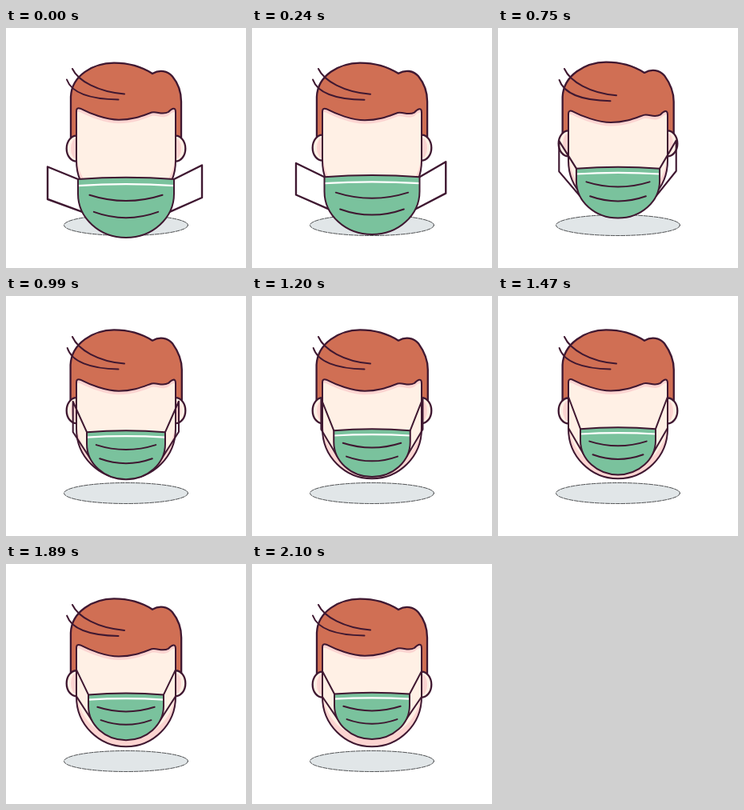
An HTML page with a canvas that plays this animation: 300 by 300 pixels, repeating every 2.73 s.

```html
<!DOCTYPE html>
<html lang="en">
<head>
<meta charset="utf-8">
<title>Face mask</title>
<style>
html, body { margin: 0; width: 100%; height: 100%; overflow: hidden; background: #fff; }
canvas { display: block; width: 300px; height: 300px; }
</style>
</head>
<body>
<canvas id="stage" width="300" height="300"></canvas>
<script>
const ctx = document.getElementById('stage').getContext('2d');
const LOOP = 2730, STEP = 30, MOVE_END = 2100, CX = 150;
const INK = '#3f1831', HAIR = '#d06f54', SKIN = '#fff0e5', BLUSH = '#fcd4d1';
const GREEN = '#7ac29d', SHADE = '#e1e6e8';

const times = [0, 240, 510, 990, 1470, 1740, 2100];
const keys = {
  top:    [189, 186.3, 182, 170.2, 166.2, 164.4, 162.5],
  height: [73, 71.7, 66, 59, 57.2, 57, 56.5],
  half:   [60, 59.5, 56, 49, 47, 47, 47],
  loopX:  [52, 55, 66, 83.7, 88, 88, 88],
  loopT:  [173.5, 169, 154, 132, 126, 130, 134],
  loopB:  [214, 208.5, 193, 170, 165, 165, 166]
};

// Smooth curve through the keys without overshoot
function sample(v, t) {
  const last = times.length - 1;
  if (t >= times[last]) return v[last];
  let i = 0;
  while (t >= times[i + 1]) i++;
  const slope = j => (v[j + 1] - v[j]) / (times[j + 1] - times[j]);
  const tangent = j => {
    if (j === 0 || j === last) return 0;
    const a = slope(j - 1), b = slope(j);
    return a * b > 0 ? 2 * a * b / (a + b) : 0;
  };
  const d = times[i + 1] - times[i], u = (t - times[i]) / d;
  const u2 = u * u, u3 = u2 * u;
  return (2 * u3 - 3 * u2 + 1) * v[i] + (u3 - 2 * u2 + u) * d * tangent(i) +
    (3 * u2 - 2 * u3) * v[i + 1] + (u3 - u2) * d * tangent(i + 1);
}

// Hair and ears ease to a raised pose, rest, then ease back
function lift(t) {
  const u = Math.max(0, Math.min(1, t / 1020, (MOVE_END - t) / 720));
  return (1 - Math.cos(Math.PI * u)) / 2;
}

function paint(path, fill, stroke, width = 2) {
  if (fill) { ctx.fillStyle = fill; ctx.fill(path); }
  if (stroke) { ctx.strokeStyle = stroke; ctx.lineWidth = width; ctx.stroke(path); }
}

function oval(x, y, rx, ry) {
  const p = new Path2D();
  p.ellipse(x, y, rx, ry, 0, 0, Math.PI * 2);
  return p;
}

function fringe(p, dy) {
  p.lineTo(88, 104 + dy);
  p.quadraticCurveTo(88, 99 + dy, 93, 100.7 + dy);
  p.bezierCurveTo(105, 107 + dy, 125, 114.7 + dy, 141, 114.7 + dy);
  p.bezierCurveTo(160, 114.7 + dy, 172, 109 + dy, 182, 105.5 + dy);
  p.bezierCurveTo(189, 103.7 + dy, 195, 109.5 + dy, 203, 105 + dy);
  p.bezierCurveTo(207, 100.5 + dy, 212, 98 + dy, 212, 105 + dy);
}

function face(dy, cy, rx, ry) {
  const p = new Path2D();
  p.moveTo(CX - rx, cy);
  fringe(p, dy);
  p.lineTo(CX + rx, cy);
  p.ellipse(CX, cy, rx, ry, 0, 0, Math.PI);
  p.closePath();
  return p;
}

function drawShadow() {
  const p = oval(CX, 246.5, 77.5, 13);
  paint(p, SHADE);
  ctx.setLineDash([5, 1.5]);
  paint(p, null, '#26282a', 0.8);
  ctx.setLineDash([]);
}

function drawEar(x, y) {
  const ear = oval(x, y, 12.3, 16);
  paint(ear, SKIN);
  paint(oval(x, y, 7, 13), BLUSH);
  paint(ear, null, INK, 2.3);
}

function drawHead(k) {
  const dy = 4 * k, up = -1.3 * k, l = 81 - 0.4 * k, r = 219 + 0.8 * k;
  const hair = new Path2D();
  hair.moveTo(l, 140 - 7 * k);
  hair.lineTo(l, 86);
  hair.bezierCurveTo(82, 59, 109, 44 + up, 135, 43.7 + up);
  hair.bezierCurveTo(155, 43.7 + up, 172, 50 + up, 183, 57 + up);
  hair.bezierCurveTo(192, 51.8 + up, 202, 53.5 + up, 208, 60.5 + up);
  hair.bezierCurveTo(215, 69, r, 80, r, 92);
  hair.lineTo(r, 140 - 7 * k);
  hair.closePath();
  paint(hair, HAIR, INK, 2.3);

  for (const x of [88, 212]) drawEar(x, 150.7 - 7.5 * k);

  const outline = face(dy, 166, 62, 62.3);
  paint(outline, BLUSH);
  ctx.save();
  ctx.clip(outline);
  paint(face(dy + 4.5, 160, 61, 58), SKIN);
  ctx.restore();
  paint(outline, null, INK);

  const strands = new Path2D();
  strands.moveTo(83, 51);
  strands.bezierCurveTo(90, 66 + k, 115, 80 + 2 * k, 148, 82.5 + 2 * k);
  strands.moveTo(76 + 0.7 * k, 64.5 + 0.5 * k);
  strands.bezierCurveTo(82, 81 + k, 105, 89 + 2 * k, 140.5, 89.5 + 2 * k);
  paint(strands, null, INK);
}

function drawLoops(m) {
  const p = new Path2D();
  const open = (88 - m.loopX) / 36;
  for (const s of [-1, 1]) {
    // The right loop opens a little less and sits higher
    const lag = s > 0 ? open : 0;
    const out = CX + s * (CX - m.loopX) - 3 * lag;
    p.moveTo(CX + s * m.half, m.top);
    p.lineTo(out, m.loopT - 2 * lag);
    p.lineTo(out, m.loopB - 2 * lag);
    p.lineTo(CX + s * m.half * 0.91, m.top + m.height * 0.56);
  }
  paint(p, null, INK, 2 + 0.4 * open);
}

function drawMask(m) {
  const { top, height: h, half: w } = m;
  const y = f => top + h * f;
  const arc = (reach, at, bend) => {
    const p = new Path2D();
    p.moveTo(CX - w * reach, y(at));
    p.quadraticCurveTo(CX, y(at + bend), CX + w * reach, y(at));
    return p;
  };
  const body = arc(1, 0, -0.065);
  body.lineTo(CX + w, y(0.25));
  body.ellipse(CX, y(0.25), w, h * 0.75, 0, 0, Math.PI);
  body.closePath();
  paint(body, GREEN);
  ctx.save();
  ctx.clip(body);
  paint(arc(1, 0.11, -0.05), null, '#fff', 2.2);
  ctx.restore();
  paint(body, null, INK);
  paint(arc(0.76, 0.27, 0.2), null, INK);
  paint(arc(0.67, 0.56, 0.2), null, INK);
}

function draw(t) {
  const m = {};
  for (const name in keys) m[name] = sample(keys[name], t);
  ctx.fillStyle = '#fff';
  ctx.fillRect(0, 0, 300, 300);
  ctx.lineCap = 'round';
  ctx.lineJoin = 'round';
  drawShadow();
  drawHead(lift(t));
  drawLoops(m);
  drawMask(m);
}

function tick() {
  const t = performance.now() % LOOP;
  draw(Math.min(MOVE_END, Math.floor(t / STEP) * STEP));
  requestAnimationFrame(tick);
}
tick();
</script>
</body>
</html>
```
